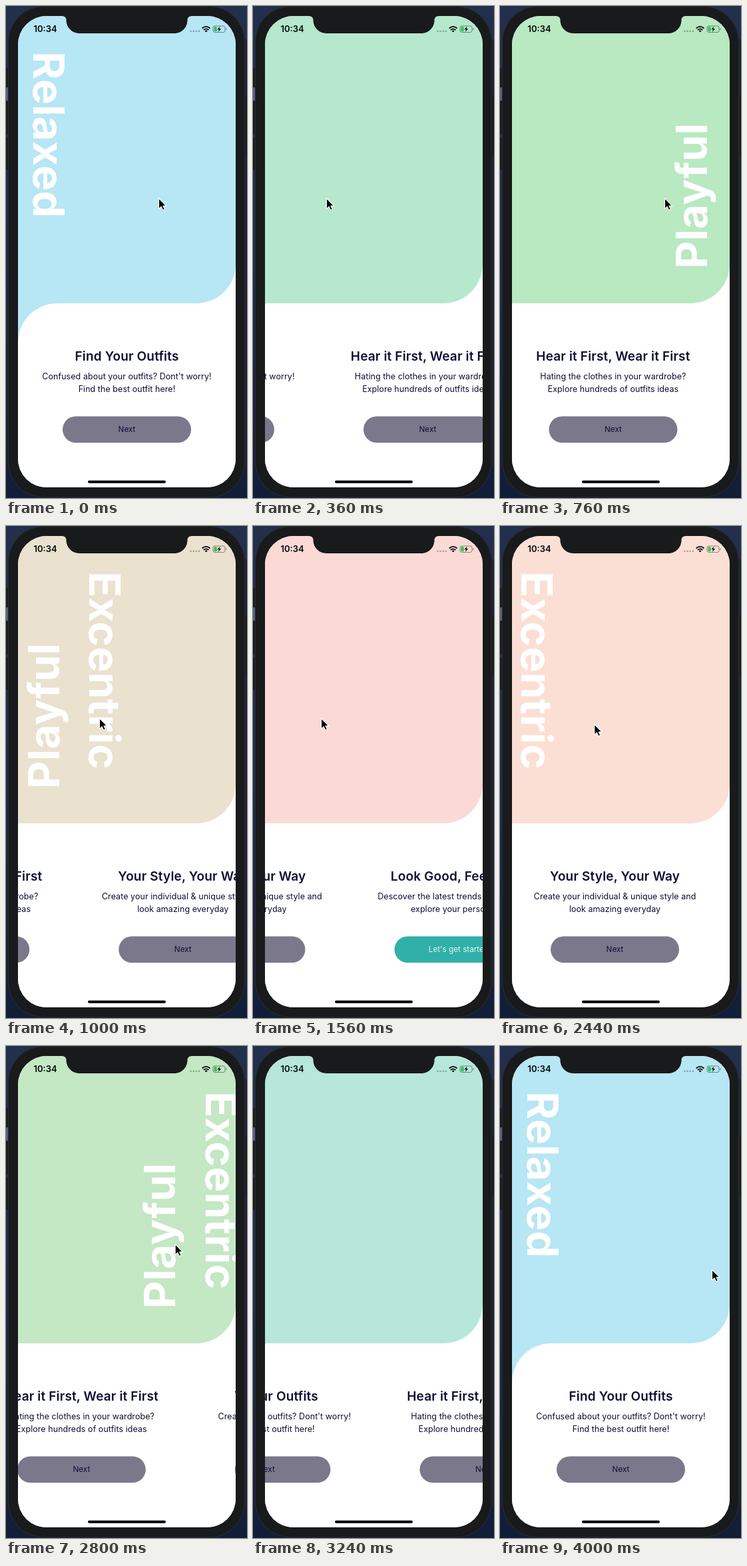
Animation of 362 by 738 pixels, one loop 4320 ms. Source, as an HTML page:

```html
<!DOCTYPE html>
<html lang="en">
<head>
<meta charset="utf-8">
<title>Onboarding</title>
<style>
  html, body { margin: 0; width: 100%; height: 100%; overflow: hidden; background: #17233f; }
  svg { display: block; width: 362px; height: 738px; font-family: Inter, "Liberation Sans", sans-serif; }
  .label { font-size: 64px; font-weight: 700; fill: #fff; letter-spacing: .2px; }
  .mid { text-anchor: middle; fill: #0e0f34; }
  .title { font-size: 19px; font-weight: 600; letter-spacing: .15px; }
  .body { font-size: 12.5px; letter-spacing: .05px; }
  .action { font-size: 11.7px; }
  .clock { font-size: 13px; font-weight: 600; fill: #05070a; }
</style>
</head>
<body>
<svg viewBox="0 0 362 738">
  <defs>
    <clipPath id="screen"><rect x="18" y="15" width="327" height="707" rx="43"/></clipPath>
    <linearGradient id="desk" x1="0" y1="0" x2="0" y2="1">
      <stop offset="0" stop-color="#22304d"/>
      <stop offset=".5" stop-color="#1d2b4e"/>
      <stop offset="1" stop-color="#121d38"/>
    </linearGradient>
  </defs>

  <rect width="362" height="738" fill="url(#desk)"/>
  <rect x="357" y="50" width="5" height="640" fill="#1a2136"/>
  <rect y="122" width="5" height="20" fill="#56607a"/>
  <g fill="#1b1c1f">
    <rect y="93" width="5" height="29"/>
    <rect y="142" width="5" height="50"/>
    <rect y="197" width="5" height="49"/>
    <rect x="358" y="134" width="4" height="90"/>
  </g>
  <rect x="3.5" y=".5" width="355" height="736.5" rx="53" fill="#191a1b" stroke="#2b2d32"/>

  <g clip-path="url(#screen)">
    <rect x="18" y="15" width="327" height="707" fill="#fff"/>
    <g id="tint">
      <path d="M18 15H345V387A59 59 0 0 1 286 446H18Z"/>
      <rect x="18" y="445" width="160" height="277"/>
    </g>
    <g id="strip">
      <path d="M18 505A59 59 0 0 1 77 446H1400V722H18Z" fill="#fff"/>
    </g>
    <path d="M84 14V15Q90.500 15 90.500 21.500A19.500 19.500 0 0 0 110 41H253A19.500 19.500 0 0 0 272.500 21.500Q272.500 15 279 15V14Z" fill="#191a1b"/>
    <text class="clock" x="41.500" y="39.300">10:34</text>
    <path d="M277.500 37.800H290" fill="none" stroke="#000" stroke-opacity=".28" stroke-width="2.800" stroke-linecap="round" stroke-dasharray="0 4.100"/>
    <g fill="none" stroke="#05070a" stroke-width="1.800">
      <path d="M294.700 33.500Q300.600 28.300 306.500 33.500"/>
      <path d="M296.900 36Q300.600 32.700 304.300 36"/>
      <path d="M298.600 37.200Q300.600 35.600 302.600 37.200L300.600 39.400Z" fill="#05070a" stroke="none"/>
    </g>
    <rect x="311" y="30" width="18" height="9.500" rx="2.700" fill="none" stroke="#000" stroke-opacity=".42"/>
    <path d="M330.400 33V36.500Q331.700 36 331.700 34.750T330.400 33Z" fill-opacity=".42"/>
    <rect x="312.300" y="31.300" width="4.500" height="6.900" rx="1.300" fill="#35c759"/>
    <path d="M321.500 30.500L317.400 35.300H319.900L318.900 39L323.100 34H320.500Z" fill="#05070a"/>
    <rect x="123" y="711.700" width="117" height="4" rx="2" fill="#000"/>
  </g>

  <path id="cursor" d="M.5 .5V16.300L4.100 12.900L6.700 18.200L9.400 17L7 11.900H11.800Z" fill="#000" stroke="#fff" stroke-width="1.100" stroke-linejoin="round"/>
</svg>

<script>
const PAGE = 327, LOOP = 4320, LAST = 4000, STEP = 40;
const DRAG = 119, DRAG_MS = 170, GLIDE_MS = 750, HOLD_MS = 300;
const $ = id => document.getElementById(id);

const slides = [
  { label: "Relaxed", rgb: [183, 230, 244], title: "Find Your Outfits",
    body: ["Confused about your outfits? Dont't worry!", "Find the best outfit here!"] },
  { label: "Playful", rgb: [181, 233, 192], title: "Hear it First, Wear it First",
    body: ["Hating the clothes in your wardrobe?", "Explore hundreds of outfits ideas"] },
  { label: "Excentric", rgb: [252, 223, 212], title: "Your Style, Your Way",
    body: ["Create your individual &amp; unique style and", "look amazing everyday"] },
  { label: "Funky", rgb: [251, 215, 214], title: "Look Good, Feel Good",
    body: ["Descover the latest trends in fashion and", "explore your personality"] }
];

const line = (cls, y, text, extra = "") =>
  `<text class="mid ${cls}" x="181.5" y="${y}" ${extra}>${text}</text>`;

$("strip").innerHTML += slides.map((s, i) => {
  const last = i === slides.length - 1;
  const turn = i % 2 ? "translate(322.5 394) rotate(-90)" : "translate(41.2 68.2) rotate(90)";
  return `<g transform="translate(${i * PAGE} 0)">
    <text class="label" transform="${turn}">${s.label}</text>
    ${line("title", 532, s.title)}
    ${s.body.map((text, n) => line("body", 560.3 + 19 * n, text)).join("")}
    <rect x="85" y="615.5" width="193" height="39.5" rx="19.75" fill="${last ? "#30b0a8" : "#7b788c"}"/>
    ${line("action", 639.4, last ? "Let's get started" : "Next", last ? 'style="fill:#e6f7f5"' : "")}
  </g>`;
}).join("");

// Three swipes forward, three back: start time and where the pointer grabs
const swipes = [
  { at: 61, x: 229 }, { at: 706, x: 259 }, { at: 1320, x: 221 },
  { at: 1920, x: 115 }, { at: 2480, x: 135 }, { at: 3033, x: 235 }
].map((s, i) => ({ ...s, y: i < 3 ? 288 : 297, dir: i < 3 ? 1 : -1 }));
const rest = { at: LAST, x: 318, y: 335 };

const clamp = v => Math.max(0, Math.min(1, v));
const smooth = v => v * v * (3 - 2 * v);
const mix = (a, b, k) => a + (b - a) * k;

// The drag speeds up, then the page glides on to its snap point
const dragged = u => DRAG * clamp(u / DRAG_MS) ** 2;
const scrolled = u => u < DRAG_MS
  ? dragged(u)
  : PAGE - (PAGE - DRAG) * (1 - clamp((u - DRAG_MS) / GLIDE_MS)) ** 5;

const offset = t => swipes.reduce((sum, s) => sum + s.dir * scrolled(t - s.at), 0);

// The pointer follows the drag, waits, then moves to the next grab point
function pointer(t) {
  const i = Math.max(0, swipes.findLastIndex(s => s.at <= t));
  const s = swipes[i], next = swipes[i + 1] || rest;
  const from = s.at + HOLD_MS;
  const k = smooth(clamp((t - from) / (next.at - from)));
  return { x: mix(s.x - s.dir * dragged(t - s.at), next.x, k), y: mix(s.y, next.y, k) };
}

function tint(page) {
  const i = Math.min(Math.floor(page), slides.length - 2);
  const next = slides[i + 1].rgb;
  return `rgb(${slides[i].rgb.map((c, n) => Math.round(mix(c, next[n], page - i)))})`;
}

function draw(t) {
  const x = offset(t), p = pointer(t);
  $("strip").setAttribute("transform", `translate(${-x} 0)`);
  $("tint").setAttribute("fill", tint(x / PAGE));
  $("cursor").setAttribute("transform", `translate(${p.x} ${p.y})`);
  $("cursor").setAttribute("visibility", p.x > 335 ? "hidden" : "visible");
}

const start = performance.now();
function tick() {
  const t = (performance.now() - start) % LOOP;
  draw(Math.min(LAST, Math.floor(t / STEP) * STEP));
  requestAnimationFrame(tick);
}
tick();
</script>
</body>
</html>
```
